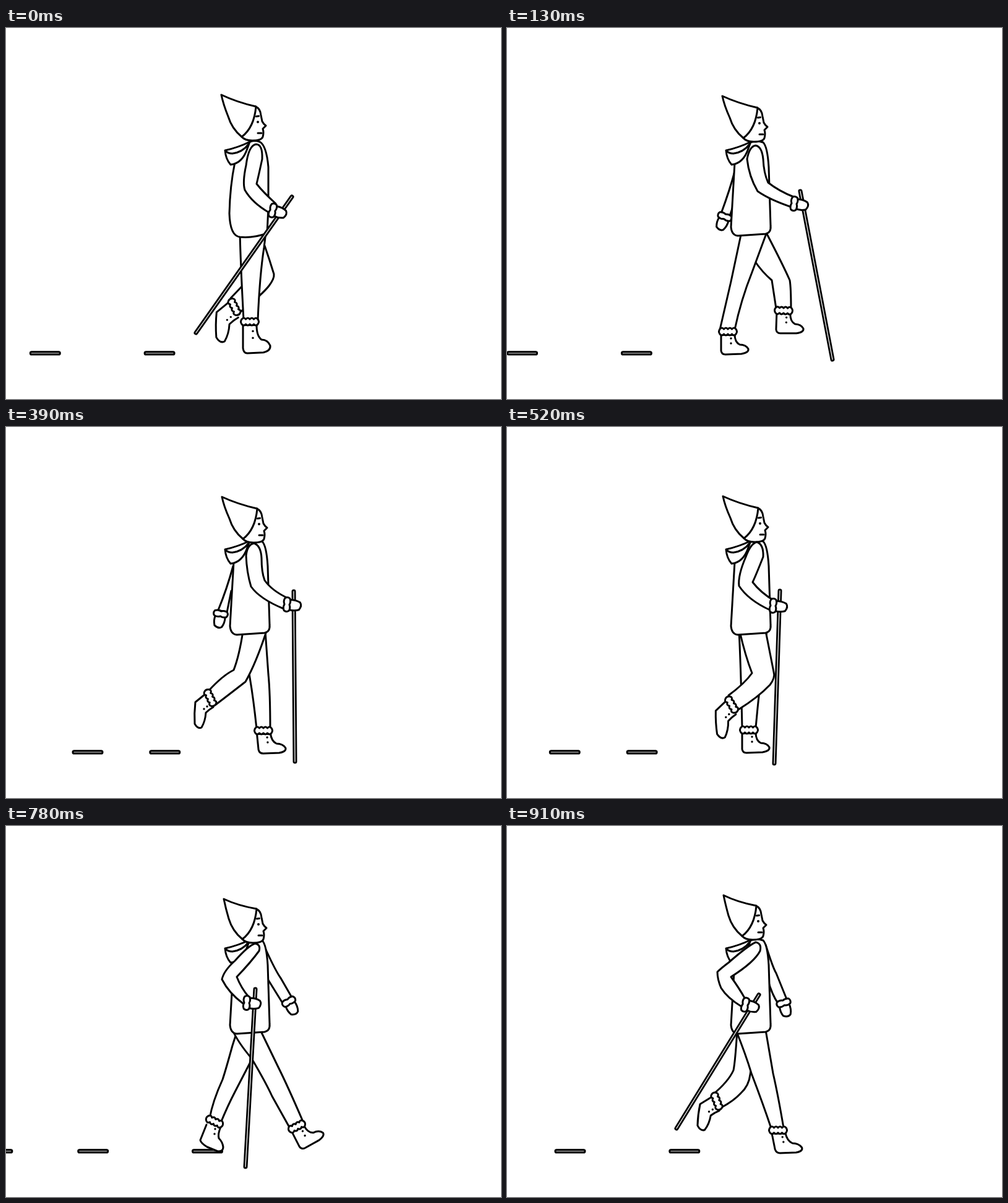
Recreate the animation shown at these times as an HTML page with a canvas. Size 800 by 600 pixels, loop 1040 ms.

```html
<!DOCTYPE html>
<html>
<head>
<meta charset="utf-8">
<style>
html, body { margin: 0; width: 100%; height: 100%; overflow: hidden; background: #fff; }
canvas { display: block; }
</style>
</head>
<body>
<canvas id="stage" width="800" height="600"></canvas>
<script>
const ctx = document.getElementById('stage').getContext('2d');
const STEP = 130, STEPS = 8, STRIDE = 38.7;

const JACKET = 'M368 218L362 322Q363 335 373 336L418 333Q427 331 426 320L423 225Q421 192 414 185Q400 180 390 187';
const ROUND_JACKET = 'M370 217Q362 255 361 300Q362 336 378 338Q400 340 422 332L424 290 424 225Q421 190 410 184Q398 180 390 187';
const HOOD = 'M354 198Q376 193 394 184L390 195Q382 219 363 221Q355 212 354 198Q358 203 366 203Q382 201 392 188';
const FACE = 'M405 132Q413 135 414 146L416 156Q418 160 422 163L417 168Q419 174 417 181Q415 187 400 187Q388 187 383 181';
const MITTEN = 'M4 -8Q14 -9 21 -5Q25 0 20 7Q12 10 4 8';

// Boots hang from the middle of their cuff; tilt is the cuff's own angle.
const FLAT = { path: 'M-11 4L-11 31Q-10 37 -4 37L22 36Q34 34 33 28Q29 21 19 21Q11 17 11 4', dots: [5, 11, 5, 19], tilt: 0 };
const PUSH = { path: 'M-13 5L-23 30Q-22 35 -12 41L5 48Q14 49 14 41Q13 33 7 27Q5 20 10 9', dots: [1, 12, 0, 20], tilt: 25 };
const LIFT = { path: 'M-8 -6L-24 7Q-26 25 -25 42Q-20 51 -14 48Q-8 38 -7 24Q-2 19 5 15', dots: [-5, 14, -10, 18], tilt: 64 };

const poses = [
  {
    jacket: ROUND_JACKET, head: [-2, -5, 1, 0],
    farLeg: 'M400 330L418 352Q426 375 433 398Q434 405 425 417Q415 430 379 459L363 437 382 417 400 395',
    farBoot: [LIFT, 369, 451, -1, 1.2, 1.16],
    leg: 'M378 330Q379 380 384 472L407 472Q410 400 417 355L420 330',
    boot: [FLAT, 394, 475, 0, 1, 1.38],
    stick: [462, 273, 307, 493],
    arm: 'M426 299Q398 283 386 262Q382 250 388 222Q392 190 404 188Q415 188 414 212Q408 240 405 252Q415 265 436 284',
    hand: [431, 295, 15]
  },
  {
    head: [-1, -3, 0, 0],
    farArm: 'M368 232Q360 262 346 300L360 304 368 280', farHand: [352, 305, 110],
    farLeg: 'M375 330Q398 383 428 408L435 454 459 454Q459 420 457 408Q447 385 420 333',
    farBoot: [FLAT, 447, 457, 2],
    leg: 'M379 330L362 410 344 488 368 488Q378 440 396 395L420 330',
    boot: [FLAT, 357, 491, 0],
    stick: [474, 264, 526, 536],
    arm: 'M461 290Q425 278 405 264Q391 240 388 212Q392 191 402 190Q412 192 414 212Q415 235 422 250Q440 264 463 273',
    hand: [464, 284, 8]
  },
  {
    head: [0, 0, 0, 0],
    farArm: 'M369 225Q356 260 333 296L347 299 366 270', farHand: [338, 301, 120],
    farLeg: 'M380 345L398 385Q420 425 447 491L467 483Q464 450 455 425Q437 385 421 330',
    farBoot: [FLAT, 459, 491, -25, .95],
    leg: 'M382 330Q365 365 345 400Q326 430 312 467L335 484Q344 465 362 440Q388 402 400 385Q412 360 421 333',
    boot: [PUSH, 321, 478, 13, .78],
    stick: [485, 263, 485, 541],
    arm: 'M463 287Q436 276 422 268Q398 240 389 207Q392 193 400 193Q410 194 416 210Q425 232 438 248Q450 258 466 269',
    hand: [468, 281, 4]
  },
  {
    head: [0, 0, 0, 0],
    farArm: 'M367 225Q357 262 343 296L357 300 364 265', farHand: [347, 302, 99],
    farLeg: 'M385 345L394 405Q400 440 405 488L427 488Q427 430 424 400L419 330',
    farBoot: [FLAT, 416, 491, 0, 1, 1, .1],
    leg: 'M383 330Q377 370 368 393Q350 402 328 426L339 449Q360 433 387 412Q404 382 421 330',
    boot: [LIFT, 330, 438, 0],
    stick: [465, 266, 467, 541],
    arm: 'M449 294Q410 278 396 258Q389 235 388 208Q390 190 401 188Q412 192 413 212Q413 235 418 248Q430 265 456 277',
    hand: [454, 287, 5]
  },
  {
    head: [0, -1, 0, 0],
    farLeg: 'M375 330Q378 390 380 486L402 486Q408 420 417 350L420 330',
    farBoot: [FLAT, 391, 490, 0],
    leg: 'M376 330Q385 370 396 398Q384 415 358 434L374 457Q406 437 425 417Q434 405 431 396Q426 370 418 330',
    boot: [LIFT, 363, 449, -5, 1.1, 1.08],
    stick: [441, 265, 432, 544],
    arm: 'M425 296Q390 280 375 257Q373 240 386 210Q394 188 404 186Q415 190 414 210Q403 238 397 251Q410 268 432 281',
    hand: [430, 289, 5]
  },
  {
    head: [0, 0, 0, 1],
    farArm: 'M421 203Q436 244 446 285L432 289 422 255', farHand: [440, 291, 76],
    farLeg: 'M371 330L362 410 352 489 371 489Q383 450 388 430L402 380',
    farBoot: [FLAT, 358, 491, 0, .9, 1, -.04],
    leg: 'M366 330Q372 347 400 382L424 405Q429 409 430 420L435 454 459 454Q459 420 457 408Q447 383 414 333',
    boot: [FLAT, 447, 457, 2, .9],
    stick: [418, 267, 397, 546],
    arm: 'M395 297Q372 278 361 254Q358 246 375 218Q395 188 407 185Q416 188 413 200Q402 222 385 250Q392 262 407 279',
    hand: [401, 289, 4]
  },
  {
    head: [-1, 2, 4, 3],
    farArm: 'M420 200Q436 235 444 246L463 279 448 288 422 246', farHand: [457, 284, 60],
    farLeg: 'M374 330L366 355Q355 395 350 410Q334 445 329 473L347 480Q358 453 370 430L400 372',
    farBoot: [PUSH, 337, 478, 0],
    leg: 'M366 330Q375 350 397 376Q420 415 430 437L459 489 480 478Q455 420 440 390L411 330',
    boot: [FLAT, 470, 486, -27],
    stick: [403, 264, 387, 551],
    arm: 'M383 287Q360 270 349 248Q352 234 370 218Q392 193 403 190Q412 192 409 202Q396 220 373 244Q380 262 392 276',
    hand: [389, 286, 4]
  },
  {
    head: [-3, -3, 4, 2],
    farArm: 'M418 192Q430 230 435 238L452 280 438 287Q428 272 422 250', farHand: [447, 286, 72],
    farLeg: 'M372 330Q369 380 366 395Q358 413 333 434L347 455Q367 444 378 432Q391 420 393 402L400 360',
    farBoot: [LIFT, 339, 445, 5, 1.1],
    leg: 'M370 330Q386 370 395 400Q414 450 427 489L447 488Q438 435 430 400L418 330',
    boot: [FLAT, 438, 492, 0, 1, 1, .2],
    stick: [407, 273, 274, 489],
    arm: 'M379 292Q356 278 346 262Q340 248 340 236Q346 230 358 221Q390 193 402 188Q412 190 409 202Q400 220 362 244Q375 262 384 278',
    hand: [385, 289, 14]
  }
];

function shape(d, matrix) {
  const path = new Path2D();
  path.addPath(new Path2D(d), matrix);
  ctx.fillStyle = '#fff';
  ctx.fill(path);
  ctx.stroke(path);
}

function dot(x, y, r = 1.7) {
  ctx.fillStyle = '#000';
  ctx.beginPath();
  ctx.arc(x, y, r, 0, 7);
  ctx.fill();
}

function at(x, y, degrees, draw) {
  ctx.save();
  ctx.translate(x, y);
  ctx.rotate(degrees * Math.PI / 180);
  draw();
  ctx.restore();
}

function cuff(r, bumps, bulge) {
  const w = 2 * r / bumps;
  const edge = s => `q${s * w / 2} ${-bulge * s} ${s * w} 0`.repeat(bumps);
  shape(`M${-r} -4${edge(1)}q3 4 0 8${edge(-1)}q-3 -4 0 -8`);
}

function boot(kind, x, y, turn, sx = 1, sy = 1, skew = 0) {
  at(x, y, turn, () => {
    const matrix = new DOMMatrix([sx, 0, skew, sy, 0, 0]);
    shape(kind.path, matrix);
    const [x1, y1, x2, y2] = kind.dots;
    for (const p of [[x1, y1], [x2, y2]]) {
      const q = matrix.transformPoint(new DOMPoint(...p));
      dot(q.x, q.y);
    }
  });
  at(x, y, turn + kind.tilt, () => cuff(13, 4, 4));
}

function hand(x, y, turn) {
  at(x, y, turn, () => {
    shape(MITTEN);
    ctx.rotate(Math.PI / 2);
    cuff(10, 2, 2.5);
  });
}

function head(dx, dy, tipX, tipY) {
  at(dx, dy, 0, () => {
    shape(FACE);
    const x = 349 + tipX, y = 113 + tipY;
    shape(`M${x} ${y}Q375 ${125 + tipY / 2} 406 132Q403 166 383 181Q367 168 361 148Q${x + 3} ${y + 15} ${x} ${y}Z`);
    shape('M406.5 148l4 -.5M409 175h6');
    dot(409, 157, 2);
  });
}

function stick(x1, y1, x2, y2) {
  const line = (width, color) => {
    ctx.lineWidth = width;
    ctx.strokeStyle = color;
    ctx.beginPath();
    ctx.moveTo(x1, y1);
    ctx.lineTo(x2, y2);
    ctx.stroke();
  };
  ctx.save();
  line(7, '#000');
  line(1.3, '#fff');
  ctx.restore();
}

function footprint(x) {
  ctx.fillStyle = '#bbb';
  ctx.beginPath();
  ctx.roundRect(x + .5, 523.8, 48, 4.2, 2.1);
  ctx.fill();
  ctx.stroke();
}

// Each foot leaves one print per loop, which drifts left for two loops.
function footprints(step) {
  for (const age of [(step + 6) % 8, (step + 6) % 8 + 8]) footprint(271 - STRIDE * age);
  for (const age of [(step + 2) % 8, (step + 2) % 8 + 8]) footprint(301 - STRIDE * age - (age > 6 ? 30 : 0));
}

function drawPose(p) {
  if (p.farArm) {
    shape(p.farArm);
    hand(...p.farHand);
  }
  shape(p.farLeg);
  boot(...p.farBoot);
  shape(p.leg);
  boot(...p.boot);
  shape(p.jacket || JACKET);
  shape(HOOD);
  head(...p.head);
  stick(...p.stick);
  shape(p.arm);
  hand(...p.hand);
}

function frame() {
  const step = Math.floor(performance.now() / STEP) % STEPS;
  ctx.clearRect(0, 0, 800, 600);
  ctx.lineWidth = 3;
  ctx.strokeStyle = '#000';
  ctx.lineCap = ctx.lineJoin = 'round';
  footprints(step);
  drawPose(poses[step]);
  requestAnimationFrame(frame);
}
frame();
</script>
</body>
</html>
```
